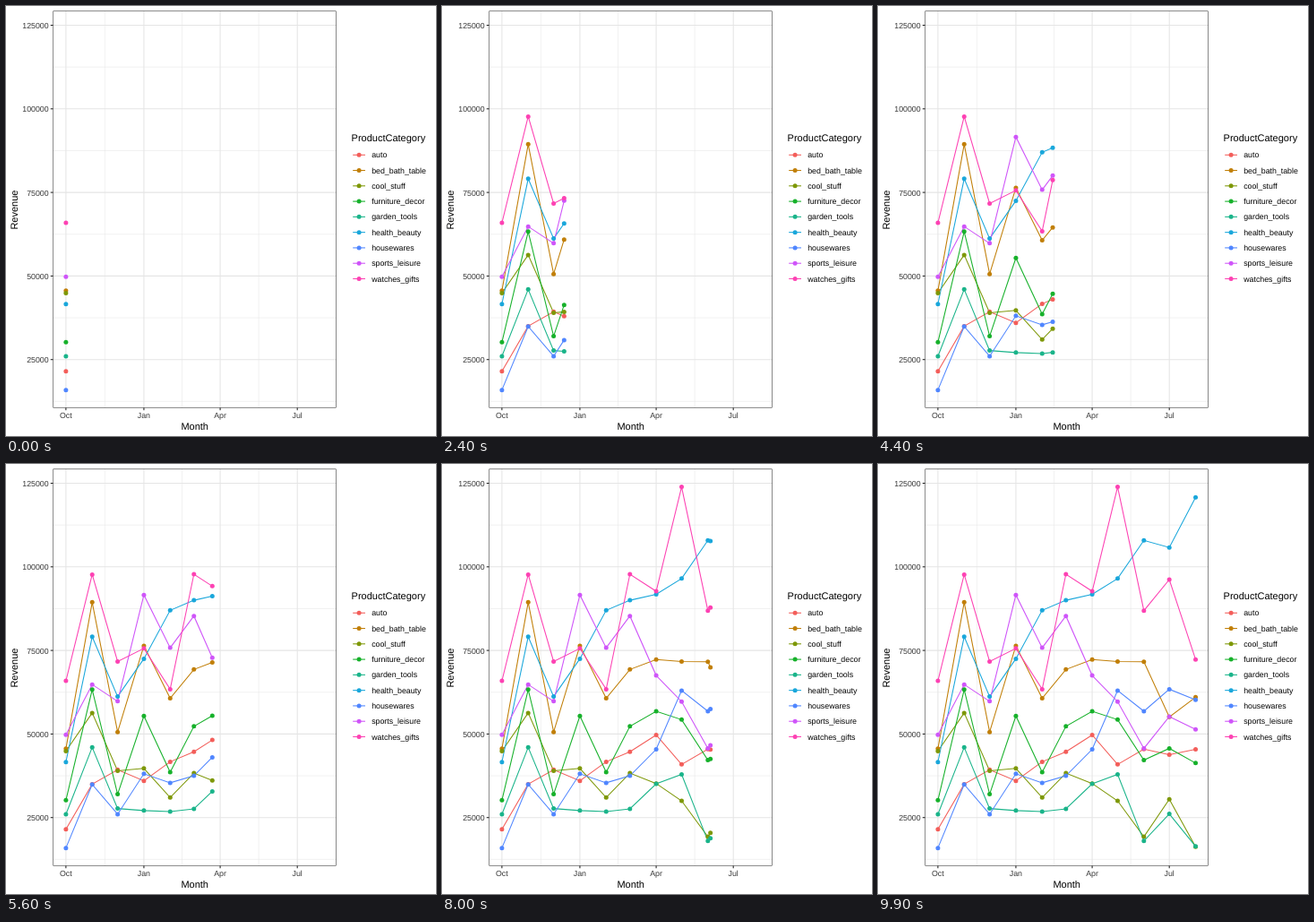
Animation, 480 px wide and 480 px high, one loop 10000 ms. Source, as an HTML page:

```html
<!DOCTYPE html>
<html lang="en">
<head>
<meta charset="utf-8">
<title>Revenue by category</title>
<style>
  html, body { margin: 0; width: 100%; height: 100%; overflow: hidden; background: #fff; }
  svg { display: block; width: 480px; height: 480px; }
  text { font: 8.8px "Liberation Sans", Arial, sans-serif; text-rendering: geometricPrecision; }
  .title { font-size: 11px; }
  .tick { fill: #363636; }
  .mid { text-anchor: middle; }
  .end { text-anchor: end; }
</style>
</head>
<body>
<svg viewBox="0 0 480 480">
  <g id="grid"></g>
  <g id="lines" fill="none" stroke-width="1.07"></g>
  <g id="points"></g>
  <g id="axes"></g>
  <g id="legend"></g>
</svg>
<script>
const FRAMES = 100, FRAME_MS = 100;
const LEFT = 52.5, RIGHT = 368.9, TOP = 5.5, BOTTOM = 448.5;

// Monthly revenue in thousands, October to August
const series = [
  { name: "auto", color: "#f35e5a", revenue: [21.5, 35, 39.3, 36, 41.7, 44.7, 49.7, 40.9, 45.5, 43.8, 45.4] },
  { name: "bed_bath_table", color: "#c17f08", revenue: [45.6, 89.4, 50.6, 76.4, 60.7, 69.3, 72.3, 71.7, 71.6, 55.1, 61] },
  { name: "cool_stuff", color: "#7e9808", revenue: [44.9, 56.3, 39, 39.7, 31, 38.3, 35.2, 30, 19.3, 30.5, 16.3] },
  { name: "furniture_decor", color: "#17b12b", revenue: [30.2, 63.3, 32, 55.4, 38.6, 52.3, 56.8, 54.3, 42.2, 45.7, 41.3] },
  { name: "garden_tools", color: "#1ab48a", revenue: [26, 46, 27.7, 27.1, 26.8, 27.6, 35.1, 37.9, 18, 26.1, 16.4] },
  { name: "health_beauty", color: "#1aa7db", revenue: [41.6, 79.1, 61.2, 72.5, 87, 90, 91.8, 96.5, 107.9, 105.8, 120.8] },
  { name: "housewares", color: "#5086ff", revenue: [15.9, 34.9, 26, 38.1, 35.4, 37.5, 45.4, 63, 56.8, 63.4, 60.2] },
  { name: "sports_leisure", color: "#cf55f9", revenue: [49.8, 64.8, 59.8, 91.6, 75.8, 85.3, 67.5, 59.7, 45.7, 55.2, 51.4] },
  { name: "watches_gifts", color: "#fd42b3", revenue: [65.9, 97.7, 71.7, 75.6, 63.4, 97.8, 92.7, 123.9, 86.9, 96.2, 72.3] }
];

// Month starts in days since October 1, and the whole frame on which each is reached
const dayOf = month => (Date.UTC(2017, 9 + month) - Date.UTC(2017, 9)) / 864e5;
const days = series[0].revenue.map((_, month) => dayOf(month));
const span = days.at(-1);
const keys = days.map(d => Math.round(d / span * (FRAMES - 1)));

// The time axis leaves 5% of the data range free on both sides
const dayX = d => LEFT + (RIGHT - LEFT) * (d / span + 0.05) / 1.1;
const valueY = v => 488 - v * 3.732;

const put = (id, markup) => document.getElementById(id).innerHTML = markup;
const line = (x1, y1, x2, y2, color, width = 1.07) =>
  `<path d="M${x1} ${y1}L${x2} ${y2}" stroke="${color}" stroke-width="${width}"/>`;
const text = (x, y, label, cls = "", extra = "") =>
  `<text x="${x}" y="${y}" class="${cls}" ${extra}>${label}</text>`;
const dot = (x, y, color) => `<circle cx="${x}" cy="${y}" r="2.5" fill="${color}"/>`;

function drawAxes() {
  const pale = "#e5e5e5", dark = "#202020", minor = 0.53;
  const across = (v, w) => line(LEFT, valueY(v), RIGHT, valueY(v), pale, w);
  const down = (d, w) => line(dayX(d), TOP, dayX(d), BOTTOM, pale, w);
  let grid = "", axes = "";

  for (let v = 25; v <= 125; v += 25) {
    const y = valueY(v);
    grid += across(v - 12.5, minor) + across(v);
    axes += line(LEFT - 2.75, y, LEFT, y, dark) + text(LEFT - 4.9, y + 3.45, v * 1000, "tick end");
  }
  ["Oct", "Jan", "Apr", "Jul"].forEach((name, quarter) => {
    const d = dayOf(quarter * 3), next = dayOf(quarter * 3 + 3), x = dayX(d);
    if (next < span) grid += down((d + next) / 2, minor);
    grid += down(d);
    axes += line(x, BOTTOM, x, BOTTOM + 2.75, dark) + text(x, 460, name, "tick mid");
  });

  // Only the inner half of the border shows
  const inset = minor / 2;
  axes += `<rect x="${LEFT + inset}" y="${TOP + inset}" width="${RIGHT - LEFT - minor}"
    height="${BOTTOM - TOP - minor}" fill="none" stroke="${dark}" stroke-width="${minor}"/>`;
  axes += text((LEFT + RIGHT) / 2, 473, "Month", "title mid");
  axes += text(0, 0, "Revenue", "title mid", 'transform="translate(13 227.6) rotate(-90)"');
  put("grid", grid);
  put("axes", axes);
}

function drawLegend() {
  put("legend", text(385.6, 151, "ProductCategory", "title") + series.map(({ name, color }, i) => {
    const y = 166.25 + i * 17.28;
    return line(387.2, y, 401, y, color) + dot(394.1, y, color) + text(408.2, y + 3.1, name);
  }).join(""));
}

function drawData(frame) {
  const last = keys.findLastIndex(k => k <= frame);
  const part = (frame - keys[last]) / (keys[last + 1] - keys[last]) || 0;
  const mix = list => list[last] + part * (list[last + 1] - list[last]);
  let lines = "", points = "";

  for (const { color, revenue } of series) {
    const trail = revenue.slice(0, last + 1).map((v, i) => [dayX(days[i]), valueY(v)]);
    if (part) trail.push([dayX(mix(days)), valueY(mix(revenue))]);
    lines += `<polyline points="${trail.join(" ")}" stroke="${color}"/>`;
    points += trail.map(([x, y]) => dot(x, y, color)).join("");
  }
  put("lines", lines);
  put("points", points);
}

let shown = -1;
const start = performance.now();
function tick() {
  const frame = Math.floor((performance.now() - start) / FRAME_MS) % FRAMES;
  if (frame !== shown) drawData(shown = frame);
  requestAnimationFrame(tick);
}

drawAxes();
drawLegend();
tick();
</script>
</body>
</html>
```
